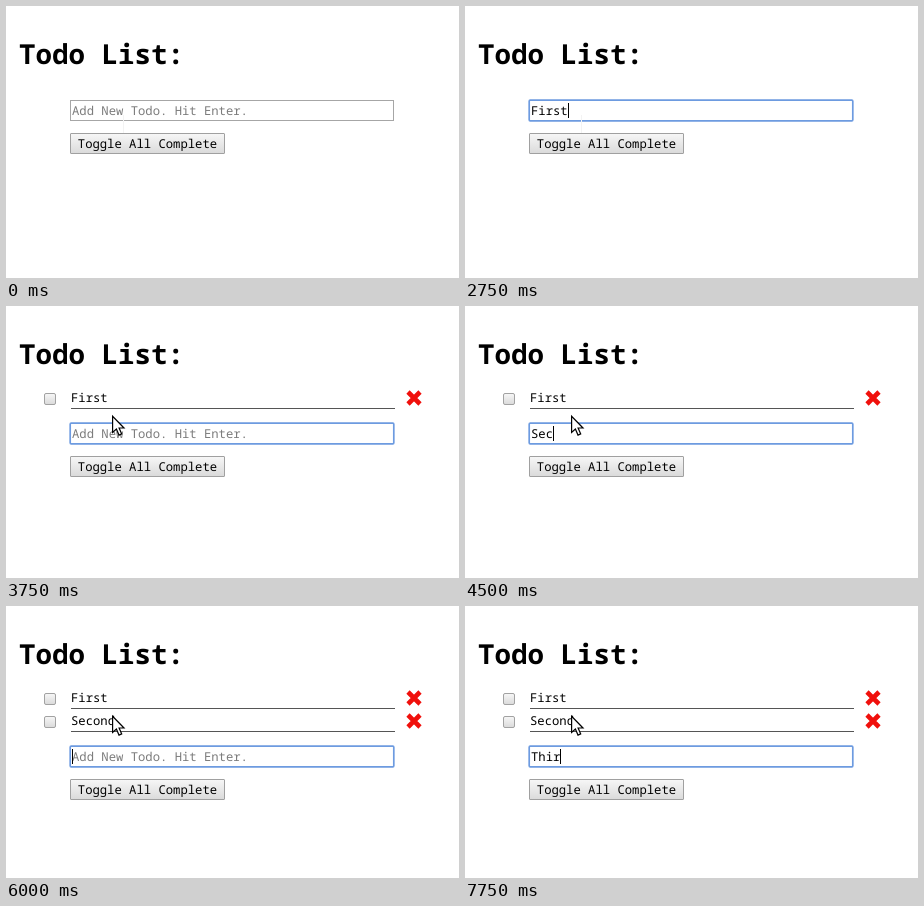
Animation, 453 px wide and 272 px high, one loop 8 s. Source, as an HTML page:

```html
<!DOCTYPE html>
<html lang="en">
<head>
<meta charset="utf-8">
<title>Todo list</title>
<style>
  html, body { margin: 0; width: 100%; height: 100%; overflow: hidden; background: #fff; }
  svg { display: block; }
  text {
    font: 12.22px "Noto Sans Mono", "DejaVu Sans Mono", monospace;
    text-rendering: geometricPrecision;
    white-space: pre;
  }
  .title { font-size: 27.5px; font-weight: 700; }
  .hint { fill: #7c7c7c; }
  .rule { fill: #555; }
  .check { fill: url(#face); stroke: #a2a2a2; }
  .cross { fill: none; stroke: #f0100c; stroke-width: 4.6; }
  .box { fill: #fff; stroke: #a6a6a6; }
  .ring { fill: none; stroke: #6d9be0; stroke-width: 1.7; }
  .button { fill: url(#face); stroke: #a0a0a0; }
  .beam { fill: none; stroke: #f3f3f3; }
  .arrow { fill: #fff; stroke: #000; stroke-width: 1.2; }
</style>
</head>
<body>
<svg width="453" height="272" viewBox="0 0 453 272">
  <defs>
    <linearGradient id="face" x2="0" y2="1">
      <stop stop-color="#f7f7f7"/>
      <stop offset="1" stop-color="#dadada"/>
    </linearGradient>
    <g id="item">
      <rect class="check" x="38.5" y="87.5" width="11" height="11" rx="1.5"/>
    </g>
  </defs>

  <text class="title" x="13" y="58">Todo List:</text>

  <g id="row0">
    <use href="#item"/>
    <g class="label">
      <text x="65" y="96">First</text>
      <rect class="rule" x="65" y="102" width="324" height="1"/>
    </g>
    <path class="cross" d="M402 86l12 12m0-12l-12 12"/>
  </g>
  <g id="row1" transform="translate(0 23)">
    <use href="#item"/>
    <g class="label">
      <text x="65" y="96">Second</text>
      <rect class="rule" x="65" y="102" width="324" height="1"/>
    </g>
    <path class="cross" d="M402 86l12 12m0-12l-12 12"/>
  </g>

  <g id="form">
    <rect class="box" x="64.5" y="94.5" width="323" height="20"/>
    <rect class="ring" id="ring" x="64.2" y="94.2" width="323.6" height="20.6" rx="1"/>
    <text id="entry" x="66" y="109"></text>
    <rect id="caret" y="97" width="1" height="15"/>
    <rect class="button" x="64.5" y="127.5" width="154" height="20" rx=".5"/>
    <text x="71.8" y="142">Toggle All Complete</text>
  </g>

  <path class="beam" id="beam" d="M.5 0v18"/>
  <path class="arrow" id="arrow" transform="translate(106.6 110.3)"
        d="M0 0V16.2L3.8 12.7L6.4 18.8L9.1 17.6L6.5 11.7H11.4Z"/>
</svg>
<script>
const LOOP = 8000;
const CHAR = 7.333;
const ROW = 23;
const HINT = "Add New Todo. Hit Enter.";

// Each step lists only what changes.
const steps = [
  { at: 0, text: "", focus: false, caret: false, rows: 0, hover: false, pointer: "beam", x: 117 },
  { at: 250, x: 116 },
  { at: 500, focus: true, caret: true },
  { at: 1000, caret: false },
  { at: 1500, caret: true },
  { at: 1750, text: "F" },
  { at: 2250, text: "Fi" },
  { at: 2500, text: "First" },
  { at: 3000, text: "", rows: 1 },
  { at: 3250, pointer: "arrow" },
  { at: 3500, hover: true },
  { at: 3750, caret: false },
  { at: 4000, text: "S", caret: true },
  { at: 4250, text: "Se" },
  { at: 4500, text: "Sec" },
  { at: 4750, text: "Seco" },
  { at: 5000, text: "Secon" },
  { at: 5250, text: "Second" },
  { at: 5750, caret: false },
  { at: 6000, text: "", caret: true, rows: 2 },
  { at: 6500, caret: false },
  { at: 7000, text: "T", caret: true },
  { at: 7500, text: "Th" },
  { at: 7750, text: "Thir" }
];

const $ = id => document.getElementById(id);
const show = (el, on) => { el.style.display = on ? "" : "none"; };
const shift = (el, x, y) => el.setAttribute("transform", `translate(${x} ${y})`);

function stateAt(time) {
  return Object.assign({}, ...steps.filter(step => step.at <= time));
}

function draw(s) {
  [$("row0"), $("row1")].forEach((row, i) => {
    show(row, i < s.rows);
    show(row.querySelector(".cross"), s.hover);
    shift(row.querySelector(".label"), s.hover ? 0 : 8, 0);
  });

  shift($("form"), 0, s.rows * ROW);
  show($("ring"), s.focus);
  $("entry").textContent = s.text || HINT;
  $("entry").classList.toggle("hint", !s.text);
  $("caret").setAttribute("x", Math.round(66 + CHAR * s.text.length));
  show($("caret"), s.caret);

  show($("beam"), s.pointer === "beam");
  show($("arrow"), s.pointer === "arrow");
  shift($("beam"), s.x, 109);
}

const start = performance.now();
function tick() {
  draw(stateAt((performance.now() - start) % LOOP));
  requestAnimationFrame(tick);
}
tick();
</script>
</body>
</html>
```
